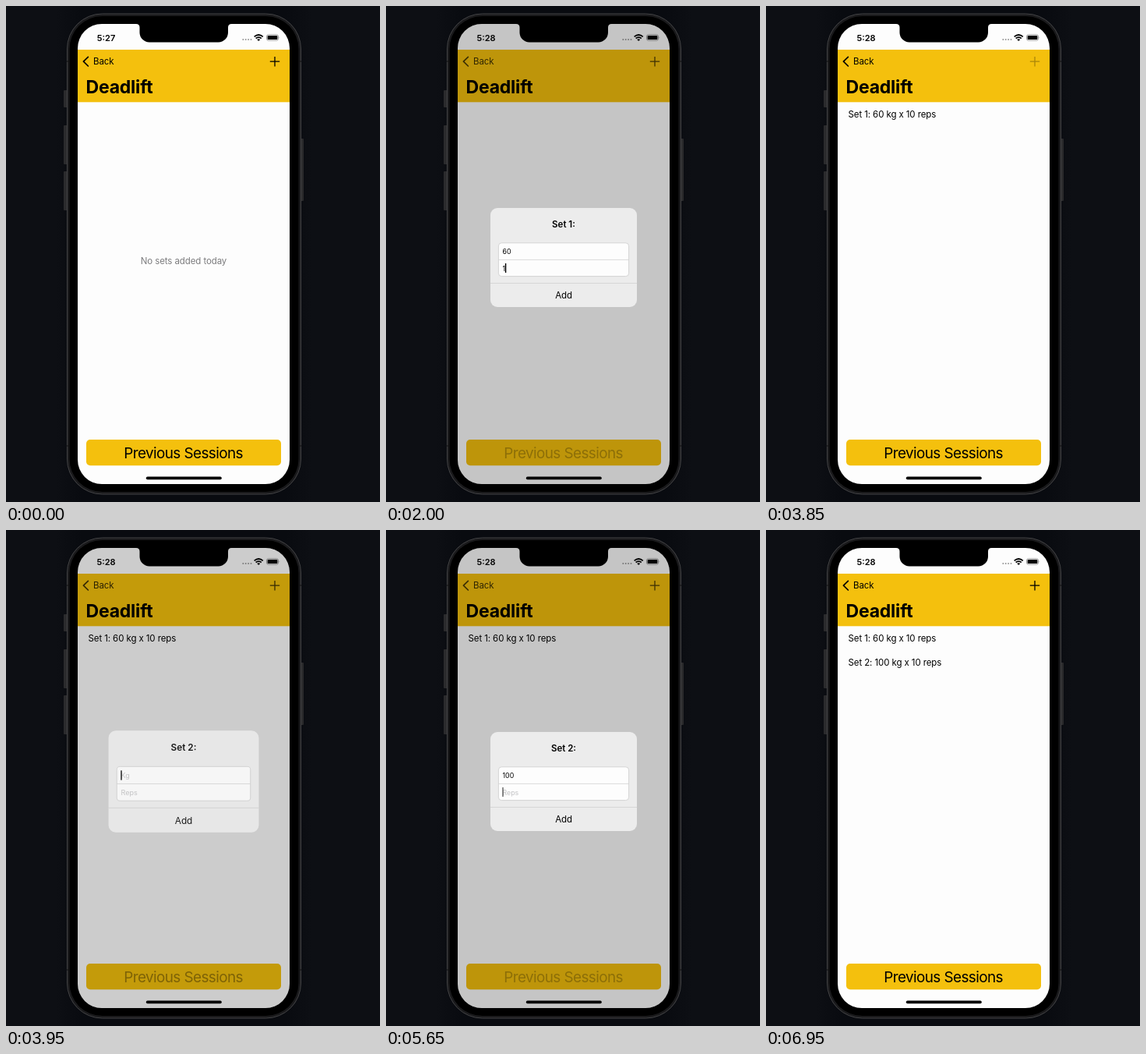
Recreate the animation shown at these times as an HTML page. Size 480x636 px, loop 7 s.

```html
<!DOCTYPE html>
<html lang="en">
<head>
<meta charset="utf-8">
<title>Workout log</title>
<style>
  html, body { margin: 0; width: 100%; height: 100%; overflow: hidden; background: #0d0f14; }
  svg { display: block; width: 480px; height: 636px; }
  text { font: 400 11.5px Inter, Roboto, sans-serif; letter-spacing: -.1px; white-space: pre; }
  .mid { text-anchor: middle; }
  .semi { font-weight: 600; letter-spacing: 0; }
  .field { font-size: 8.8px; letter-spacing: 0; }
</style>
</head>
<body>
<svg viewBox="0 0 480 636">
  <defs>
    <linearGradient id="shade">
      <stop offset="0" stop-color="#090b10" stop-opacity="0"/>
      <stop offset=".1" stop-color="#090b10"/>
      <stop offset=".9" stop-color="#090b10"/>
      <stop offset="1" stop-color="#090b10" stop-opacity="0"/>
    </linearGradient>
    <clipPath id="screen"><rect x="92" y="23" width="272" height="590" rx="31"/></clipPath>
  </defs>

  <rect width="480" height="636" fill="#0d0f14"/>
  <rect x="64" width="328" height="636" fill="url(#shade)"/>

  <!-- phone body -->
  <g fill="#2b2b2d">
    <rect x="74" y="108" width="6" height="22" rx="1"/>
    <rect x="74" y="153" width="6" height="50" rx="1"/>
    <rect x="74" y="212" width="6" height="50" rx="1"/>
    <rect x="377" y="170" width="5" height="80" rx="1"/>
  </g>
  <rect x="78.5" y="10" width="300" height="616" rx="45" fill="#1a1a1c" stroke="#434345"/>
  <rect x="81.5" y="13" width="294" height="610" rx="42" fill="#000"/>
  <path d="M78 71h4M375 71h4M78 564h4M375 564h4" stroke="#111"/>

  <g clip-path="url(#screen)">
    <rect x="92" y="23" width="272" height="590" fill="#fdfdfd"/>
    <rect x="92" y="56" width="272" height="67.3" fill="#f4c00d"/>
    <text id="clock" class="semi mid" x="128.5" y="44.6" style="font-size:11px"></text>

    <g fill="#999">
      <circle cx="304.3" cy="43" r="1"/><circle cx="307.7" cy="43" r="1"/>
      <circle cx="311.1" cy="43" r="1"/><circle cx="314.5" cy="43" r="1"/>
    </g>
    <g fill="none" stroke="#000" stroke-width="1.7">
      <path d="M318.6 39.3q5.6-4.6 11.2 0"/>
      <path d="M320.6 41.5q3.6-2.8 7.2 0"/>
    </g>
    <path d="M322.2 43q2-1.3 4 0l-2 2z"/>
    <rect x="334.5" y="36.8" width="15" height="7.4" rx="2.2" fill="none" stroke="#888" stroke-width=".8"/>
    <rect x="335.6" y="37.9" width="12.8" height="5.2" rx="1.2"/>
    <path d="M350.6 39.2q1.2 1.3 0 2.6z" fill="#888"/>

    <path id="chevron" d="M105.4 65.4l-6 5.8 6 5.8" fill="none" stroke="#000" stroke-width="1.7" stroke-linecap="round" stroke-linejoin="round"/>
    <text id="back" x="112" y="75.4">Back</text>
    <path id="plus" d="M338.8 71.2h12.4M345 65v12.4" stroke="#000" stroke-width="1.3"/>
    <text x="102.5" y="112" style="font-weight:700;font-size:23px;letter-spacing:-.2px">Deadlift</text>

    <text id="empty" class="mid" x="228" y="330.8" fill="#7c7c7e">No sets added today</text>
    <text id="row1" x="105.5" y="143.2">Set 1: 60 kg x 10 reps</text>
    <text id="row2" x="105.5" y="174">Set 2: 100 kg x 10 reps</text>

    <rect x="103" y="556" width="250" height="33.3" rx="5" fill="#f4c00d"/>
    <text id="sessions" class="mid" x="227.6" y="579.6" style="font-size:18.9px;letter-spacing:-.58px">Previous Sessions</text>
    <rect x="179.8" y="603.6" width="97" height="3.6" rx="1.8"/>
    <rect id="dim" x="92" y="23" width="272" height="590"/>

    <g id="alert">
      <rect x="134" y="259" width="188" height="127" rx="9" fill="#ececec"/>
      <path id="pressed" d="M134 355.5h188v21.5a9 9 0 0 1-9 9h-170a9 9 0 0 1-9-9z" fill-opacity=".07"/>
      <text id="heading" class="semi mid" x="228" y="284.4"></text>
      <rect x="144.4" y="303.8" width="167.2" height="42.8" rx="4" fill="#fdfdfd" stroke="#c6c6c6" stroke-width=".7"/>
      <path d="M144.5 325.4h167M134 355.5h188" stroke="#cdcdcd" stroke-width=".7"/>
      <text id="kg" class="field" x="149.5" y="318.2"></text>
      <text id="reps" class="field" x="149.5" y="339.7"></text>
      <rect id="caret" width="1.4" height="12"/>
      <text class="mid" x="228" y="375.2">Add</text>
    </g>
  </g>

  <!-- notch -->
  <path d="M167 22v1q4.5 0 4.5 4.5V34a12.5 12.5 0 0 0 12.5 12.5h88.500a12.500 12.500 0 0 0 12.500-12.500v-6.500q0-4.500 4.500-4.500v-1z"/>
</svg>

<script>
const LOOP = 7000, STEP = 50;
const IDLE = 300, FADE = 80;   // caret rests, then fades
const CLOSE = 280;

const sets = [
  { open: 200, kg: '60', kgAt: [950, 1200], move: 1450, reps: '10', repsAt: [1950, 2350], press: 2900, close: 3050 },
  { open: 3850, kg: '100', kgAt: [4650, 4950, 5200], move: 5320, reps: '10', repsAt: [5750, 5900], press: 6200, close: 6350 }
];

const el = {};
document.querySelectorAll('[id]').forEach(node => el[node.id] = node);

const clamp = v => Math.max(0, Math.min(1, v));
const smooth = v => (v = clamp(v), v * v * (3 - 2 * v));
const mix = (a, b, k) => a + (b - a) * k;
const fade = (node, v) => node.setAttribute('opacity', v);
const typed = (text, times, t) => text.slice(0, times.filter(at => at <= t).length);

function fill(node, value, hint) {
  node.textContent = value || hint;
  node.setAttribute('fill', value ? '#000' : '#c2c2c4');
}

function drawAlert(s, t, level) {
  const scale = 1 + .19 * Math.exp(-Math.max(0, t - s.open) / 50);
  el.alert.setAttribute('transform', `translate(228 322.500) scale(${scale}) translate(-228 -322.500)`);
  fade(el.alert, level);
  fade(el.pressed, t >= s.press && t < s.press + 150 ? 1 : 0);
  el.heading.textContent = `Set ${sets.indexOf(s) + 1}:`;

  const kg = typed(s.kg, s.kgAt, t), reps = typed(s.reps, s.repsAt, t);
  fill(el.kg, kg, 'Kg');
  fill(el.reps, reps, 'Reps');

  const onReps = t >= s.move;
  const node = onReps ? el.reps : el.kg;
  const width = (onReps ? reps : kg) ? node.getComputedTextLength() : 0;
  const last = Math.max(...[s.open + 130, ...s.kgAt, s.move, ...s.repsAt].filter((at, i) => !i || at <= t));
  el.caret.setAttribute('x', 149.3 + width);
  el.caret.setAttribute('y', onReps ? 330 : 308.7);
  fade(el.caret, t >= s.close ? 0 : 1 - clamp((t - last - IDLE) / FADE));
}

function draw(t) {
  const s = sets[t < sets[1].open - STEP ? 0 : 1];
  const shown = t < s.open ? 0 : 1 - Math.exp((s.open - t) / 50);
  const level = shown * (1 - smooth((t - s.close) / CLOSE));
  const tapped = t >= s.open - STEP && t <= s.open;

  el.clock.textContent = t < 1200 ? '5:27' : '5:28';
  fade(el.empty, t < sets[0].close + 100 ? 1 : 0);
  fade(el.row1, t < sets[0].close + 100 ? 0 : 1);
  fade(el.row2, t < sets[1].close + 100 ? 0 : 1);

  fade(el.dim, .225 * level);
  fade(el.chevron, mix(1, .68, level));
  fade(el.back, mix(1, .75, level));
  fade(el.sessions, mix(1, .26, level));
  fade(el.plus, tapped ? .3 : t > s.close ? 1 : mix(1, .68, level));
  drawAlert(s, t, level);
}

const start = performance.now();
function tick() {
  const t = (performance.now() - start) % LOOP;
  draw(Math.floor(t / STEP) * STEP);
  requestAnimationFrame(tick);
}
tick();
</script>
</body>
</html>
```
